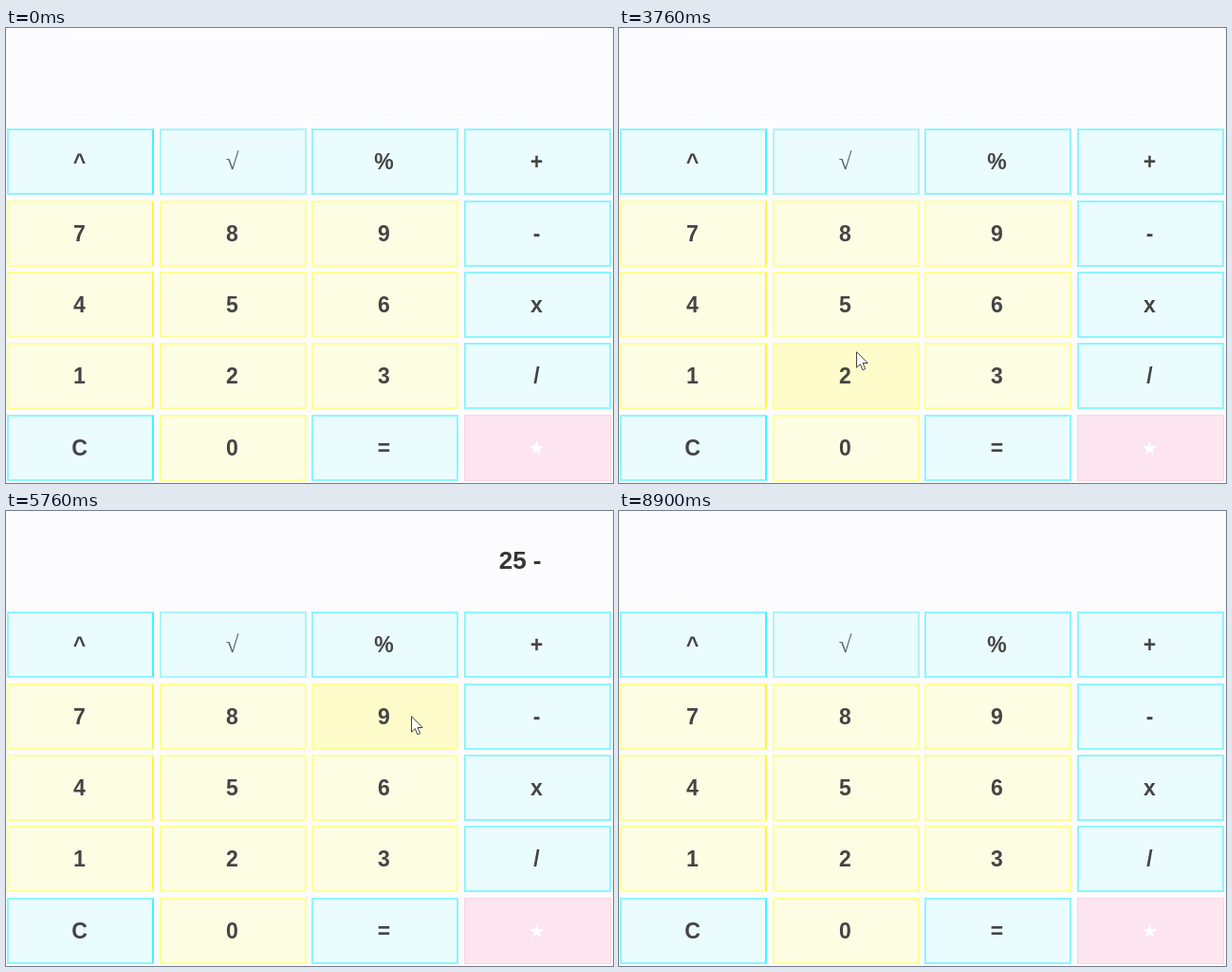
Write an HTML page that moves like this. It is 640 px wide and 480 px high and loops after 9.76 s.

```html
<!DOCTYPE html>
<html lang="en">
<head>
<meta charset="utf-8">
<title>Calculator</title>
<style>
html, body { margin: 0; width: 100%; height: 100%; overflow: hidden; background: #fcfcff; }
#stage { position: relative; width: 640px; height: 480px; overflow: hidden; font: bold 23px "Liberation Sans", Arial, sans-serif; }
#stage > * { position: absolute; box-sizing: border-box; }
#display { left: 69px; top: 13px; width: 500px; height: 79px; border: 1px solid #f7f9fb; border-bottom: 1px dotted #f0f2f3; border-right: 0; }
#value { right: 75.5px; top: 37px; font-size: 26px; line-height: 30px; color: #363636; white-space: pre; }
.key { width: 155px; height: 70px; display: flex; align-items: center; justify-content: center; border: 2px solid; color: #444; }
.key span { position: relative; left: -1px; }
.key i { position: absolute; inset: 0; opacity: 0; }
.op { background: #ebfcff; border-color: #8cf6fd; }
.op i { background: #ccfcff; }
.num { background: #fdfde4; border-color: #ffff94; }
.num i { background: #fdfcca; }
.star { background: #fde5ef; border: 1px solid #fdd3dd; color: #fff; font: 20px "DejaVu Sans", sans-serif; }
.star i { background: #fbd3e2; }
.root { border-color: #a8f5fb; color: #566068; font: 25px "Liberation Serif", serif; }
.op.first { border-right-color: #3cf6ff; }
.num.first { border-right-color: #fff640; }
#cursor { left: 0; top: 0; overflow: visible; }
</style>
</head>
<body>
<div id="stage">
  <div id="display"></div>
  <div id="value"></div>
  <svg id="cursor" width="13" height="21">
    <path d="M.5 .7V17.2L4.3 13.6L7 19.8L9.7 18.6L7.1 12.5H12.2Z" fill="#fff" stroke="#444"/>
  </svg>
</div>
<script>
const LOOP = 9760, FADE = 50, SAMPLES = 10, KEY_W = 155, KEY_H = 70;
const stage = document.getElementById('stage');
const cursor = document.getElementById('cursor');
const value = document.getElementById('value');

// Pointer moves: leave, arrive, x, y
const moves = [
  [0, 1, 576, 470],
  [2600, 2700, 163, 419],
  [2700, 2930, 232, 190],
  [3100, 3760, 250, 341],
  [4000, 4660, 282, 309],
  [4830, 5100, 578, 254],
  [5100, 5260, 588, 216],
  [5500, 5850, 396, 216],
  [6130, 6600, 102, 468],
  [7200, 7660, 282, 309],
  [8000, 8500, 102, 440],
  [8620, 8830, -14, 446]
];
const presses = [
  [3930, '2'], [4800, '5'], [5430, '-'], [6030, '9'], [6800, 'C'], [7900, '5'], [8600, 'C']
];

const keys = [...'^√%+789-456x123/C0=★'].map((label, n) => {
  const col = n % 4, row = n >> 2;
  const x = Math.round(1 + col * 160.6), y = Math.floor(106.6 + row * 75.4);
  const el = document.createElement('div');
  const kind = /\d/.test(label) ? 'num' : label === '★' ? 'star' : 'op';
  el.className = `key ${kind}${col ? '' : ' first'}${label === '√' ? ' root' : ''}`;
  el.style.left = x + 'px';
  el.style.top = y + 'px';
  el.innerHTML = `<i></i><span>${label}</span>`;
  stage.insertBefore(el, cursor);
  return { x, y, tint: el.firstChild };
});

const smooth = u => u * u * (3 - 2 * u);
const visible = t => (t >= 1360 && t < 1400) || (t >= 2700 && t < 8830);

function pointer(t) {
  if (!visible(t)) return null;
  const i = moves.findLastIndex(m => m[0] <= t);
  const [leave, arrive, x, y] = moves[i];
  const [, , fromX, fromY] = moves[Math.max(0, i - 1)];
  const s = smooth(Math.min(1, (t - leave) / (arrive - leave)));
  return [fromX + (x - fromX) * s, fromY + (y - fromY) * s];
}

function entry(t) {
  return presses.filter(p => p[0] <= t)
    .reduce((text, [, key]) => key === 'C' ? '' : text + (key === '-' ? ' - ' : key), '')
    .trimEnd();
}

const over = (p, k) => p && p[0] >= k.x && p[0] < k.x + KEY_W && p[1] >= k.y && p[1] < k.y + KEY_H;

function draw(t) {
  const p = pointer(t);
  cursor.style.display = p ? 'block' : 'none';
  if (p) cursor.style.transform = `translate(${Math.round(p[0])}px, ${Math.round(p[1])}px)`;
  // Hover tint is the share of recent time spent on the key.
  const trail = Array.from({ length: SAMPLES }, (_, n) => pointer(t - n * FADE / SAMPLES));
  for (const k of keys) k.tint.style.opacity = trail.filter(q => over(q, k)).length / SAMPLES;
  value.textContent = entry(t);
}

const start = performance.now();
function tick() {
  draw((performance.now() - start) % LOOP);
  requestAnimationFrame(tick);
}
tick();
</script>
</body>
</html>
```
